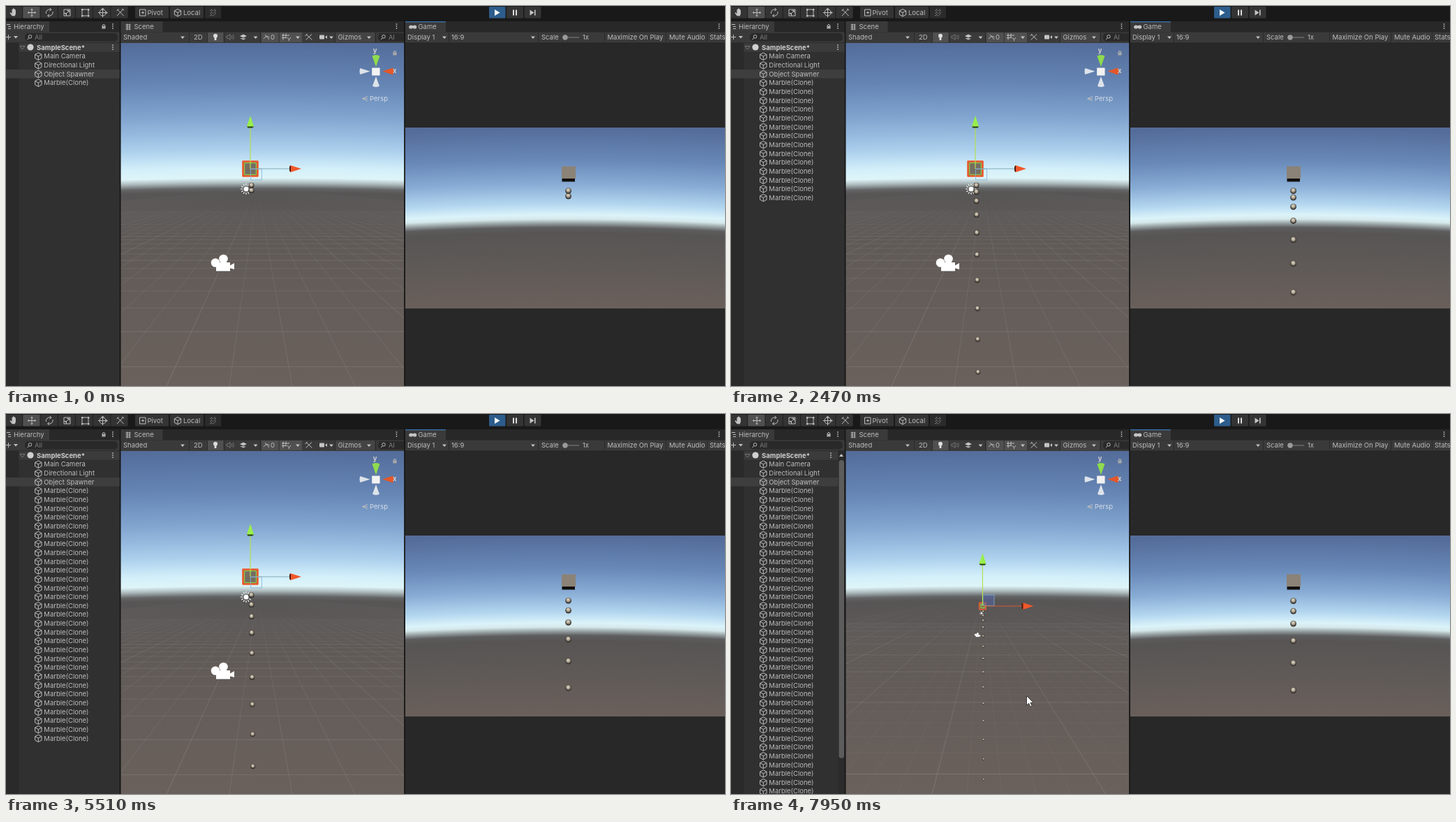
An HTML page with a canvas that plays this animation: 1030 px wide and 544 px high, repeating every 8000 ms.

```html
<!DOCTYPE html>
<html lang="en">
<head>
<meta charset="utf-8">
<title>Marble spawner</title>
<style>
  html, body { margin: 0; width: 1030px; height: 544px; overflow: hidden; background: #282828; }
  canvas, svg { position: absolute; left: 0; top: 0; display: block; }
  text { font: 9.5px Inter, sans-serif; fill: #bcbcbc; white-space: pre; }
  .dim { fill: #7d7d7d; }
  .bold { font-weight: 700; fill: #cfcfcf; }
  .line { fill: none; stroke: #bdbdbd; stroke-width: 1; }
  .soft { fill: none; stroke: #747474; stroke-width: 1; }
  .fill { fill: #c4c4c4; }
</style>
</head>
<body>
<canvas id="view" width="1030" height="544"></canvas>
<svg id="ui" width="1030" height="544" viewBox="0 0 1030 544"></svg>
<script>
const LOOP = 8000, STEP = 77.8, LAST = 102;
const ctx = document.getElementById('view').getContext('2d');
const ui = document.getElementById('ui');

/* ---------- editor chrome ---------- */
const rect = (x, y, w, h, fill, r = 0) => `<rect x="${x}" y="${y}" width="${w}" height="${h}" rx="${r}" fill="${fill}"/>`;
const label = (x, y, s, cls = '') => `<text x="${x}" y="${y + 3.4}" class="${cls}">${s}</text>`;
const path = (d, cls = 'line') => `<path class="${cls}" d="${d}"/>`;
const caret = (x, y) => path(`M${x - 3} ${y - 1.5}h6l-3 3.5z`, 'fill');
const kebab = (x, y) => [-3, 0, 3].map(d => rect(x - .8, y + d - .8, 1.6, 1.6, '#bdbdbd')).join('');
const lens = (x, y) => `<circle class="line" cx="${x}" cy="${y}" r="2.3"/>` + path(`M${x - 1.6} ${y + 1.8}l-2.4 2.6`);
const cube = (x, y) => path(`M${x} ${y - 5}l4.7 2.4v5.4L${x} ${y + 5.4}l-4.7-2.6v-5.4zM${x - 4.7} ${y - 2.6}L${x} ${y}l4.7-2.6M${x} ${y}v5.4`);
const lock = (x, y) => rect(x - 2.6, y - .5, 5.2, 4, '#a8a8a8') + path(`M${x - 1.7} ${y}v-1.6q1.7-2.6 3.4 0V${y}`);
const rowY = i => 72 + 12.65 * i;
const row = (i, s) => cube(46.3, rowY(i)) + label(54.3, rowY(i), s);

function topBar() {
  let s = rect(0, 0, 1030, 22, '#191919');
  for (let i = 0; i < 7; i++) s += rect(i * 25.2 - 1, 1, 24.4, 16.5, i === 1 ? '#505050' : '#343434', 1);
  s += rect(185, 1, 48, 16.5, '#343434', 1) + rect(235, 1, 48, 16.5, '#343434', 1) + rect(285, 1, 23, 16.5, '#2b2b2b', 1);
  s += path('M8.500 14l-3-4 1-1 2 2v-6h1.300v4-5.500h1.400v5.500-5h1.400v5.500-4h1.300v6l-1.500 3z', 'fill');
  s += path('M37 4v11M31.500 9.500h11M35.500 5.500L37 4l1.500 1.500M35.500 13.500L37 15l1.500-1.500M33 8l-1.500 1.500L33 11M41 8l1.500 1.500L41 11');
  s += path('M57.500 11a5 5 0 0 1 7-5.700M67 8a5 5 0 0 1-7 5.700M63 3l2 2.300-2.600 1.700M61.500 16l-2-2.300 2.600-1.700');
  s += path('M83 5h9v9h-9zM85 12l5-5M87.500 6.500h3v3M83 10.500h3.500V14');
  s += path('M109 5h9v9h-9z') + [108, 117].map(x => rect(x, 4, 2.4, 2.4, '#bdbdbd') + rect(x, 13, 2.4, 2.4, '#bdbdbd')).join('');
  s += `<circle class="line" cx="138.500" cy="9.500" r="4.500"/>` + path('M138.500 3v13M132 9.500h13M136.500 5l2-2 2 2M143 7.500l2 2-2 2');
  s += path('M159.500 5l9 9M168 4.500l-9 9.500M158.500 7l3-3M166 4l3 2');
  s += path('M191.500 5h8.500v9h-8.500zM194 9.500h4M196 7.500v4') + label(202.5, 9.7, 'Pivot');
  s += cube(246, 9.5) + label(254, 9.7, 'Local');
  s += `<path class="soft" stroke-dasharray="2 1.500" d="M292 6.500h10M292 10h10M292 13.500h6M294.500 4v11M299 4v11"/>`;
  s += rect(692, 1, 23.5, 16.5, '#2d5d8c', 1) + rect(717, 1, 24, 16.5, '#343434', 1) + rect(742.5, 1, 24, 16.5, '#343434', 1);
  s += '<path fill="#fff" d="M700 5l7.500 4.500L700 14z"/>' + rect(726, 5.5, 2, 8, '#ddd') + rect(730, 5.5, 2, 8, '#ddd');
  return s + path('M750.500 5.500l6 4-6 4zM757 5.500h1.600v8H757z', 'fill');
}

function hierarchy() {
  let s = rect(0, 22, 163, 522, '#303030') + rect(0, 22, 163, 15.5, '#282828') + rect(0, 22, 62, 15.5, '#3a3a3a');
  s += rect(0, 37.5, 163, 15.5, '#3a3a3a') + rect(0, 52.5, 163, .8, '#222') + rect(0, 53, 18.5, 491, '#2a2a2a');
  s += path('M1 26.500h5M3 29.500h4M3 32.500h4') + label(11, 30, 'Hierarchy') + lock(140, 29) + kebab(153, 29);
  s += path('M0 44.500h7M3.500 41v7') + caret(14, 44.5) + rect(27, 39, 133, 11.5, '#292929', 5) + lens(34.5, 43.8) + label(41, 44.7, 'All', 'dim');
  s += rect(18.5, 53.2, 144.5, 12.4, '#3b3b3b') + path('M20 57.500h7l-3.500 4.500z', 'soft');
  s += '<circle cx="35" cy="59" r="4.600" fill="#cfcfcf"/>' + label(44, 59.2, 'SampleScene*', 'bold');
  s += `<g id="menu">${kebab(153, 59)}</g>` + rect(0, 91, 163, 12.5, '#3e3e3e');
  s += row(0, 'Main Camera') + row(1, 'Directional Light') + row(2, 'Object Spawner');
  for (let i = 0; i < 35; i++) s += `<g class="marble">${row(i + 3, 'Marble(Clone)')}</g>`;
  s += `<g id="bar">${rect(153.5, 53, 9.500, 491, '#2b2b2b')}${path('M155 61h6l-3-4z', 'fill')}<rect id="thumb" x="154.500" y="66" width="7.500" height="457" rx="3.700" fill="#5c5c5c"/></g>`;
  return s + rect(162.8, 22, 1.7, 522, '#161616');
}

function sceneBar() {
  let s = rect(164.5, 22, 406, 15.5, '#282828') + rect(164.5, 22, 60, 15.5, '#3a3a3a') + rect(164.5, 37.5, 406, 15.5, '#3a3a3a');
  s += path('M171.500 27h7M171.500 30h7M171.500 33h7M173.500 25.500v9M177 25.500v9') + label(183.5, 30, 'Scene') + kebab(559.5, 29);
  s += label(168, 45, 'Shaded') + caret(253, 45) + `<g style="font-size:8px">${label(269, 45, '2D')}</g>`;
  s += [[262, 1], [288, 1], [312, 1], [364, 1], [471, 1], [529, 1]].map(p => rect(p[0], 38, p[1], 14, '#2a2a2a')).join('');
  s += rect(289, 38, 22.5, 14, '#505050') + rect(366, 38, 24.5, 14, '#505050') + rect(392, 38, 32, 14, '#505050') + rect(472, 38, 56, 14, '#444');
  s += '<circle cx="300" cy="42.800" r="3" fill="#ddd"/>' + rect(298.6, 45, 2.8, 4, '#ddd');
  s += path('M316 43h2l3-2.500v8l-3-2.500h-2zM323 42q2 2.500 0 5M325 41q3 3.500 0 7', 'soft');
  s += path('M335 43l5-2.500 5 2.500-5 2.500zM335 46l5 2.500 4-2', 'fill') + caret(357.500, 45);
  s += path('M369 47q4-6 8.500-2M371 41l6 7') + label(379, 45, '0');
  s += path('M395 42h11M395 45.500h7M397 39.500v9M401 39.500v6M403 45l2.500 3 2.500-3M405.500 48v2') + caret(418, 45);
  s += path('M430 40.500l8.500 8M438 40.500l-8.500 8M428.500 43l3-3') + rect(449, 41.5, 7, 6, '#c4c4c4', 1) + path('M457 44.500l3-2.500v5z', 'fill') + caret(466, 45);
  s += label(475.5, 45, 'Gizmos') + caret(520, 45);
  s += `<path d="M570.500 39h-32q-5.500 0-5.500 5.700t5.500 5.700h32z" fill="#292929"/>` + lens(541, 43.8) + label(548, 44.7, 'Al', 'dim');
  return s + rect(570.2, 22, 1.8, 522, '#161616');
}

function gameBar() {
  let s = rect(572, 22, 458, 15.5, '#282828') + rect(572, 22, 58, 15.5, '#3a3a3a') + rect(572, 22, 58, 1.2, '#3a79bb');
  s += rect(572, 37.5, 458, 15.5, '#3a3a3a') + rect(572, 52.5, 458, .8, '#222');
  s += `<ellipse cx="580" cy="30" rx="2.800" ry="2.600" fill="#c4c4c4"/><ellipse cx="585.500" cy="30" rx="2.800" ry="2.600" fill="#c4c4c4"/>` + rect(579, 28, 7, 3.5, '#c4c4c4');
  s += label(590.5, 30, 'Game') + kebab(1021.5, 29);
  s += label(575, 45, 'Display 1') + caret(628, 45) + rect(634, 38, 1, 14, '#2a2a2a') + label(638, 45, '16:9') + caret(755, 45) + rect(762, 38, 1, 14, '#2a2a2a');
  s += label(767, 45, 'Scale') + rect(797, 44.3, 24, 1.4, '#6d6d6d') + '<circle cx="801" cy="45" r="3.700" fill="#9b9b9b"/>' + label(826, 45, '1x');
  s += [857, 945, 1004].map(x => rect(x, 38, 1, 14, '#2a2a2a')).join('');
  return s + label(861.5, 45, 'Maximize On Play') + label(950, 45, 'Mute Audio') + label(1008, 45, 'Stats');
}

function axisGizmo() {
  const cone = (d, fill) => `<path d="${d}" fill="${fill}"/>`;
  let s = cone('M524.500 71.500q5.500-3 11 0L530 87z', '#8fdc4c') + cone('M554 88.500q3 5 0 10L539.500 93.500z', '#e4572a');
  s += cone('M507.500 89q-2 4.500 0 9L521.500 93.500z', '#dde3ea') + cone('M525 114.500q5 3 10 0L530 101z', '#dde3ea');
  s += rect(524.2, 88.5, 11.4, 11, '#f2f2f2');
  s += '<g style="--c:#fff">' + label(525.8, 63.5, 'y', 'bold') + label(554, 93, 'x', 'bold') + '</g>';
  s += lock(557, 67) + path('M518 129.500l-7.500 3.200 7.500 3.200M511 132.700h7') + `<text x="521" y="136.200" style="fill:#d3dbe6">Persp</text>`;
  return s;
}

ui.innerHTML = topBar() + hierarchy() + sceneBar() + gameBar() + axisGizmo() +
  '<path id="cursor" d="M0 0v13.500l3.100-2.900 2.200 4.800 2.300-1-2.200-4.700h4.300z" fill="#fff" stroke="#222" stroke-width=".8"/>';
const rows = [...ui.querySelectorAll('.marble')];
const [bar, thumb, menu, cursor] = ['bar', 'thumb', 'menu', 'cursor'].map(id => document.getElementById(id));

/* ---------- skies ---------- */
function sky(x, y, w, h, bend, stops) {
  const c = document.createElement('canvas');
  c.width = w; c.height = h;
  const g = c.getContext('2d');
  for (let i = 0; i < w; i += 2) {
    const d = (i / w * 2 - 1) ** 2 * bend;
    const grad = g.createLinearGradient(0, d, 0, h + d);
    for (const [at, col] of stops) grad.addColorStop((at - y) / h, col);
    g.fillStyle = grad;
    g.fillRect(i, 0, 2, h);
  }
  return () => ctx.drawImage(c, x, y);
}
const sceneSky = sky(164, 53, 407, 491, 3, [[53, '#546d9b'], [110, '#6585b4'], [160, '#82a6d0'], [205, '#abcfec'],
  [232, '#d3effa'], [246, '#def5f8'], [253, '#aebcbf'], [261, '#636465'], [267, '#575555'], [330, '#605a57'], [544, '#6a615c']]);
const gameSky = sky(572, 174, 458, 259, 6, [[174, '#546c99'], [220, '#6888b7'], [255, '#88acd5'], [283, '#b3d6ef'],
  [299, '#dbf3fa'], [305, '#d5e8ea'], [310, '#a0acae'], [317, '#5d5d5e'], [325, '#575554'], [433, '#6a605b']]);

/* ---------- viewports ---------- */
const CX = 367.5, CY = 298.5, HORIZON = 260;

function poly(fill, ...p) {
  ctx.fillStyle = fill;
  ctx.beginPath();
  for (let i = 0; i < p.length; i += 2) ctx.lineTo(p[i], p[i + 1]);
  ctx.fill();
}
function seg(col, w, x1, y1, x2, y2) {
  ctx.strokeStyle = col; ctx.lineWidth = w;
  ctx.beginPath(); ctx.moveTo(x1, y1); ctx.lineTo(x2, y2); ctx.stroke();
}
function disc(x, y, r, fill) {
  ctx.fillStyle = fill;
  ctx.beginPath(); ctx.arc(x, y, r, 0, 7); ctx.fill();
}
function ball(x, y, r) {
  const g = ctx.createRadialGradient(x - r * .1, y - r * .4, 0, x, y - r * .1, r * 1.1);
  g.addColorStop(0, '#e6decd'); g.addColorStop(.45, '#b3aa9a'); g.addColorStop(.8, '#4a443d'); g.addColorStop(1, '#1d1a17');
  disc(x, y, r, g);
}
function clipped(x, y, w, h, draw) {
  ctx.save(); ctx.beginPath(); ctx.rect(x, y, w, h); ctx.clip(); draw(); ctx.restore();
}

// The next marble pushes the previous one down as it appears.
function marbles(u, draw) {
  for (let i = 0; i <= u; i++) {
    const age = u - i, hit = age >= 1, fix = i ? 0 : .16;
    draw(hit, (hit ? age + .1 - fix : age) ** 2);
  }
}

function grid(Z) {
  const h = 1 + .55 * (Z - 1), fade = 1 / Z;
  const shade = a => {
    const g = ctx.createLinearGradient(0, 264, 0, 544);
    g.addColorStop(0, 'rgba(165,165,165,0)');
    g.addColorStop(.3, `rgba(165,165,165,${a * .7})`);
    g.addColorStop(1, `rgba(165,165,165,${a})`);
    return g;
  };
  const minor = shade(.2 * fade), major = shade(.3);
  for (let n = -32; n <= 33; n++) {
    const big = (n + 42) % 5 === 0;
    seg(big ? major : minor, 1, 360, HORIZON, 360 + (50 + 90 * n) / h, 544);
  }
  for (let n = -22; n < 28; n++) {
    const v = (.0039 + n * .00095 + .0112 * (Z - 1)) / h;
    if (v < .0035) continue;
    const y = HORIZON + 1 / v, big = (n + 25) % 5 === 1;
    seg(big ? major : minor, 1, 164, y, 571, y);
  }
}

function filmCamera(x, y, k) {
  ctx.save(); ctx.translate(x, y); ctx.scale(k, k);
  disc(-10, -.5, 6.3, '#fff'); disc(1.5, -6, 6.3, '#fff');
  ctx.fillStyle = '#fff';
  ctx.fillRect(-9, -1, 20, 13);
  poly('#fff', 10, 4, 17, 0, 17, 9, 10, 7);
  seg('#555', 1, -9, 12, 11, 12);
  ctx.restore();
}

function sun(x, y, k) {
  for (let i = 0; i < 12; i++) {
    const c = Math.cos(i * Math.PI / 6), s = Math.sin(i * Math.PI / 6);
    seg('#f4f4f0', 1.2 * k, x + c * 5 * k, y + s * 5 * k, x + c * 7.8 * k, y + s * 7.8 * k);
  }
  disc(x, y, 4.3 * k, '#555');
  disc(x, y, 3.5 * k, '#fff');
}

function spawner(Z) {
  const x = CX - 17.5 / Z, y = CY - 65.5 / Z + 2 * (Z - 1), zoomed = Z > 1;
  const s = 21 / Z + (zoomed ? 1 : 0), r = s / 2;
  ctx.fillStyle = '#756d62'; ctx.fillRect(x - r, y - r, s, s);
  ctx.strokeStyle = '#ee5a2c'; ctx.lineWidth = Z > 1.8 ? 1.6 : 2.6; ctx.lineJoin = 'round';
  ctx.strokeRect(x - r, y - r, s, s);
  const q = Math.max(r - 2.2, 2);
  ctx.strokeStyle = '#8fdc3c'; ctx.lineWidth = 1;
  ctx.strokeRect(x - q, y - q, 2 * q, 2 * q);
  ctx.strokeStyle = '#7fb4dc'; ctx.lineWidth = .8;
  if (Z > 1.8) { ctx.fillStyle = 'rgba(84,100,170,.5)'; ctx.fillRect(x, y - 16, 16, 16); }
  ctx.strokeRect(x + .5, zoomed ? y - 16 : y + .5, 16, 15.5);
  seg('#b4e050', 1.2, x, y, x, y - 60);
  seg(zoomed ? '#d85a34' : '#84acbb', 1.1, x, y, x + 58, y);
  poly('#98ee4c', x, y - 76, x + 5.2, y - 60, x - 5.2, y - 60);
  poly('#1f3a10', x - 5.2, y - 60.5, x + 5.2, y - 60.5, x + 3, y - 58.5, x - 3, y - 58.5);
  poly('#f0582a', x + 73, y, x + 57.5, y - 5, x + 57.5, y + 5);
  poly('#4a1a0c', x + 58, y - 5, x + 58, y + 5, x + 56, y + 3, x + 56, y - 3);
}

function scene(u, Z) {
  sceneSky();
  grid(Z);
  const place = (ox, oy, z0, draw) => {
    const k = z0 / (z0 + Z - 1);
    draw(CX + ox * k, CY + oy * k, k);
  };
  place(-23.5, -36.5, .85, sun);
  marbles(u, (hit, sq) => {
    const w = 3.45 * sq, z = Z + .00057 * w;
    ball(CX - 16 / z, CY + ((hit ? -39 : -42) + w) / z, 4 / z + (Z > 1 ? .1 : 0));
  });
  place(-57.5, 69.5, .5, filmCamera);
  spawner(Z);
}

function game(u) {
  gameSky();
  marbles(u, (hit, sq) => ball(805.6, (hit ? 267.5 : 264.4) + 3.5 * sq, 4.4));
  ctx.fillStyle = '#12100e'; ctx.fillRect(796.5, 245, 18.5, 6.5);
  ctx.fillStyle = '#8b8377'; ctx.fillRect(796, 229.5, 20, 17.5);
}

/* ---------- timeline ---------- */
function render(t) {
  const T = Math.min(LAST, Math.floor((t + 14) / STEP)) * STEP;
  const u = 1.2 + T * .005009;
  const count = T < 70 ? 1 : Math.floor(u) + 1;
  const Z = Math.exp(Math.max(0, T - 6476) * .00062);

  ctx.fillStyle = '#282828';
  ctx.fillRect(0, 0, 1030, 544);
  clipped(164, 53, 407, 491, () => scene(u, Z));
  clipped(572, 174, 458, 259, () => game(u));

  rows.forEach((r, i) => r.style.display = i < count ? '' : 'none');
  const full = count >= 35;
  bar.style.display = full ? '' : 'none';
  menu.setAttribute('transform', `translate(${full ? -10 : 0} 0)`);
  thumb.setAttribute('height', 457 - 7.6 * (count - 37));

  const p = Math.min(1, Math.max(0, (T - 5850) / 450)), e = 1 - (1 - p) ** 2;
  cursor.style.display = p > 0 ? '' : 'none';
  cursor.setAttribute('transform', `translate(${480 - 56.5 * e} ${403.5 * e})`);
}

function tick() {
  render(performance.now() % LOOP);
  requestAnimationFrame(tick);
}
tick();
</script>
</body>
</html>
```
